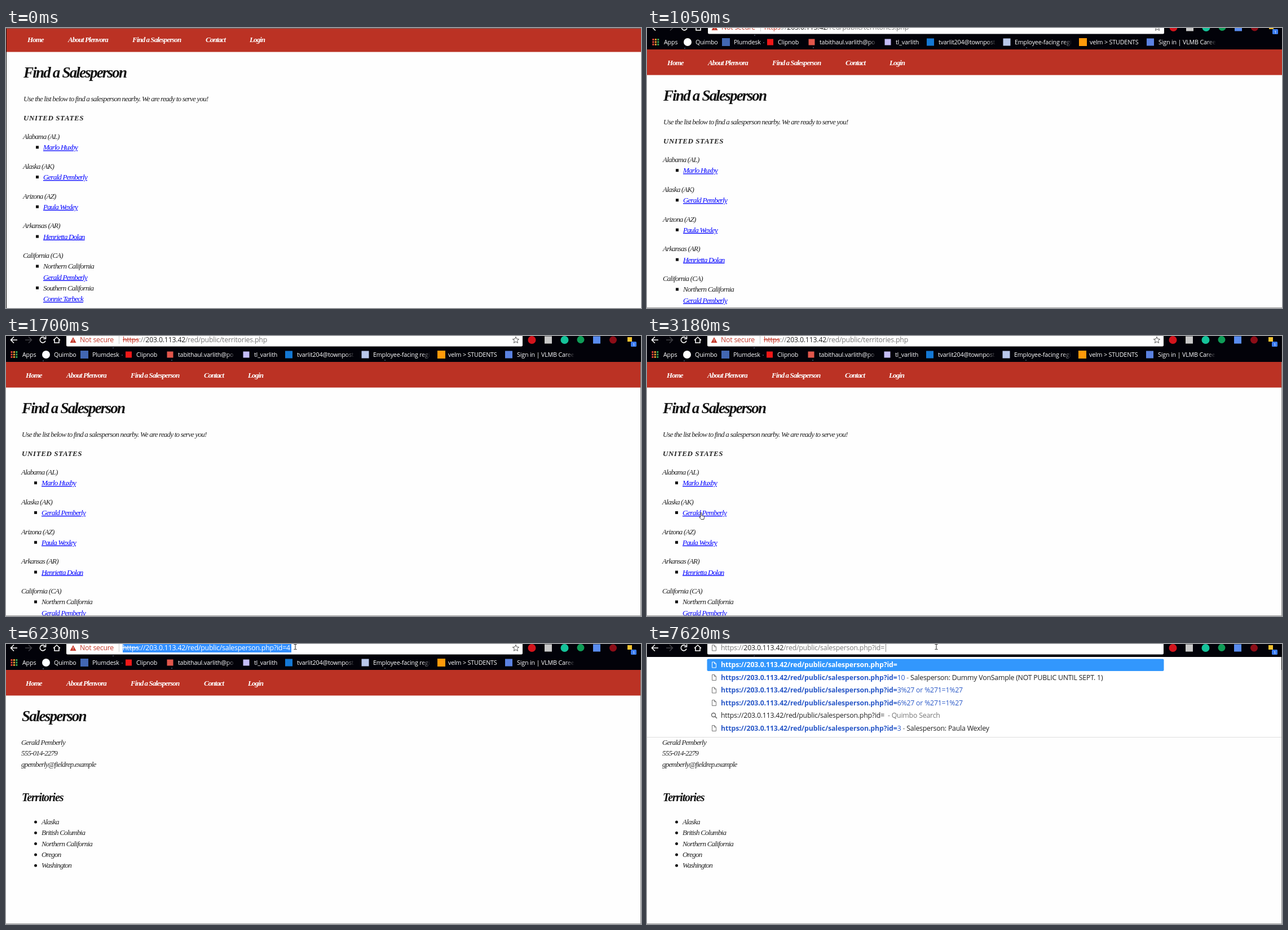
An HTML page for the animation above (8000 ms loop, 1126 px wide and 497 px high).

```html
<!DOCTYPE html>
<html lang="en">
<head>
<meta charset="utf-8">
<title>Find a Salesperson</title>
<style>
html, body { margin: 0; width: 100%; height: 100%; overflow: hidden; background: #111; }
svg { display: block; width: 1126px; height: 497px; }
text { white-space: pre; }
.body, .nav, .caps, .h1, .h2 { font-family: "Liberation Serif", serif; font-style: italic; fill: #222; }
.body { font-size: 13px; letter-spacing: -.8px; }
.nav { font-size: 13px; font-weight: 700; letter-spacing: -.95px; fill: #fff; }
.caps { font-size: 13px; font-weight: 700; letter-spacing: .6px; }
.h1 { font-size: 27px; font-weight: 700; letter-spacing: -1.8px; fill: #111; }
.h2 { font-size: 20px; font-weight: 700; letter-spacing: -1.15px; fill: #111; }
.link { fill: #00f; text-decoration: underline; }
.mark, .url, .badge { font-family: "Open Sans", sans-serif; }
.mark { font-size: 10.7px; letter-spacing: -.15px; fill: #fff; }
.badge { font-size: 8px; fill: #fff; }
.url { font-size: 12.3px; letter-spacing: -.2px; fill: #777; }
.host { fill: #222; }
.bad { fill: #c5392b; }
.strike { text-decoration: line-through; }
.bold { font-weight: 700; letter-spacing: -.1px; }
.blue { fill: #2a59c8; }
.white, .selected, .selected tspan { fill: #fff; }
.line { fill: none; stroke: #fff; stroke-width: 1.6; }
</style>
</head>
<body>
<svg id="stage" viewBox="0 0 1126 497"></svg>
<script>
const LOOP = 8000;
const IP = '203.0.113.42';
const PERSON = '/red/public/salesperson.php?id=';

const text = (x, y, s, cls = 'body') => `<text x="${x}" y="${y}" class="${cls}">${s}</text>`;
const rect = (x, y, w, h, fill, more = '') =>
  `<rect x="${x}" y="${y}" width="${w}" height="${h}" fill="${fill}" ${more}/>`;
const dot = (x, y, r, fill) => `<circle cx="${x}" cy="${y}" r="${r}" fill="${fill}"/>`;
const path = (d, more) => `<path d="${d}" ${more}/>`;
const span = (cls, s) => `<tspan class="${cls}">${s}</tspan>`;
const group = (id, s) => `<g id="${id}">${s}</g>`;
const square = (x, y, size, fill) => rect(x - size / 2, y - size / 2, size, size, fill);
const docIcon = (y, color) =>
  path(`M115.5 ${y - 5}h4l3 3v7h-7zM119.5 ${y - 5}v3h3`, `fill="none" stroke="${color}"`);

// Bookmark label; with an end it fades out there
function mark(x, s, end) {
  if (!end) return text(x, 37, s, 'mark');
  return `<linearGradient id="fade${x}" gradientUnits="userSpaceOnUse" x1="${end - 16}" x2="${end}" y1="0" y2="0">
    <stop stop-color="#fff"/><stop offset="1" stop-color="#fff" stop-opacity="0"/></linearGradient>
    <text x="${x}" y="37" class="mark" style="fill:url(#fade${x})">${s}</text>`;
}

function bookmarks() {
  let s = rect(-2, -40, 1127, 86, '#020209');
  const apps = ['#e8453c', '#f0a030', '#3aa757', '#4285f4'];
  for (let i = 0; i < 9; i++) {
    const col = i % 3, row = Math.floor(i / 3);
    s += rect(8.5 + col * 4.4, 27 + row * 4.4, 3, 3, apps[(i + row) % 4]);
  }
  for (const [x, y] of [[66, 44], [206, 34], [294, 43], [672, 43], [190, 21]]) s += dot(x, y, .8, '#89b');
  s += dot(71, 33, 7, '#fff') + square(139, 33, 14, '#4267b2') + square(217.5, 33, 11, '#f01818')
    + square(291, 33, 11, '#e2574c') + square(426, 33, 11, '#c4bdf6') + square(501.5, 33, 13, '#1478d4')
    + square(637, 33, 13, '#b9c8ea') + square(772, 33, 14, '#ff9a0a') + square(891.5, 33, 13, '#5b82e2');
  return s + mark(29, 'Apps') + mark(85, 'Quimbo') + mark(153, 'Plumdesk') + mark(231, 'Clipnob')
    + mark(305, 'tabithaul.varlith@po', 407) + mark(440, 'tl_varlith')
    + mark(516, 'tvarlit204@townpost.c', 618) + mark(651, 'Employee-facing regi', 753)
    + mark(784, 'velm &gt; STUDENTS') + mark(906, 'Sign in | VLMB Career', 1008);
}

function toolbar() {
  return path('M20 7H9M14 1.5L8.5 7l5.5 5.5', 'class="line"')
    + path('M34 7h11M40 1.5L45.5 7l-5.5 5.5', 'class="line" opacity=".25"')
    + group('reload', path('M69 3.5a5 5 0 1 0 1 5M70.5 .5v4.5h-4.5', 'class="line"'))
    + group('stop', path('M60.5 2.5l9 9M69.5 2.5l-9 9', 'class="line"'))
    + path('M84 7.5l6-5.5 6 5.5M86 6.5v5.5h8v-5.5', 'class="line"')
    + rect(107, -9, 809, 27.5, '#fff', 'rx="2"')
    + group('star', path('M904 1.5l1.6 3.7 4 .4-3 2.7.9 4-3.5-2.1-3.5 2.1.9-4-3-2.7 4-.4z', 'fill="none" stroke="#555"'))
    + dot(932.5, 7, 7, '#d3141c') + square(961.5, 7, 13, '#c9c9c9') + dot(990.5, 7, 7, '#15c39a')
    + dot(1019, 6.5, 6.5, '#0f9d58') + square(1047.5, 7, 13, '#5a8df0') + dot(1076.5, 7, 6.5, '#8c0d17')
    + square(1106, 6, 8, '#f2c230')
    + rect(1108, 10, 10, 9, '#3b7cf0', 'rx="1.5"') + text(1111, 17.5, '1', 'badge');
}

const insecure = group('insecure',
  path('M119 2l5.5 10h-11z', 'fill="#c5392b"') + rect(118.5, 5.5, 1, 3, '#fff') + rect(118.5, 9.5, 1, 1, '#fff')
  + text(131, 11, 'Not secure', 'url bad') + rect(200, 0, 1, 14, '#ccc'));

const address = (id, tail) =>
  `<text id="${id}" x="207" y="11" class="url">${span('bad strike', 'https')}://${span('host', IP)}${tail}</text>`;

function listPage() {
  const states = [['Alabama (AL)', 'Marlo Huxby'], ['Alaska (AK)', 'Gerald Pemberly'],
    ['Arizona (AZ)', 'Paula Wexley'], ['Arkansas (AR)', 'Henrietta Dolan'], ['California (CA)']];
  const areas = [['Northern California', 'Gerald Pemberly'], ['Southern California', 'Connie Tarbeck']];
  const bullet = y => rect(50, y - 7, 5, 5, '#111');
  let s = text(28, 137, 'Find a Salesperson', 'h1')
    + text(28, 179, 'Use the list below to find a salesperson nearby. We are ready to serve you!')
    + text(28, 213, 'UNITED STATES', 'caps');
  states.forEach(([state, name], i) => {
    const y = 246 + 52.8 * i;
    s += text(27, y, state);
    if (name) s += bullet(y + 19.2) + text(63, y + 19.2, name, 'body link');
  });
  areas.forEach(([area, name], i) => {
    const y = 476.4 + 38.4 * i;
    s += bullet(y) + text(63, y, area) + text(63, y + 19.2, name, 'body link');
  });
  return group('list', s);
}

function personPage() {
  let s = text(28, 137, 'Salesperson', 'h1') + text(28, 279, 'Territories', 'h2');
  ['Gerald Pemberly', '555-014-2279', 'gpemberly@fieldrep.example'].forEach((v, i) => s += text(27, 179 + 19.3 * i, v));
  ['Alaska', 'British Columbia', 'Northern California', 'Oregon', 'Washington'].forEach((v, i) => {
    const y = 320 + 19.3 * i;
    s += dot(52.5, y - 4, 2.5, '#111') + text(63, y, v);
  });
  return group('person', s);
}

function dropdown() {
  const link = `https://${IP}${PERSON}`;
  const bold = span('bold blue', link);
  const rows = [
    span('bold white', link),
    bold + span('blue', '10') + ' - ' + span('host', 'Salesperson: Dummy VonSample (NOT PUBLIC UNTIL SEPT. 1)'),
    bold + span('blue', '3%27 or %271=1%27'),
    bold + span('blue', '6%27 or %271=1%27'),
    span('host', link) + '  - Quimbo Search',
    bold + span('blue', '3') + ' - ' + span('host', 'Salesperson: Paula Wexley')
  ];
  let s = docIcon(7, '#777') + text(131, 11, `https://${span('host', IP)}${PERSON}`, 'url')
    + rect(423, 0, 1, 14, '#888')
    + rect(-2, 23, 1127, 142, '#fff') + rect(-2, 165, 1127, 1, '#ddd')
    + rect(106.5, 26.5, 810, 21.5, '#3297fd', 'rx="2"');
  rows.forEach((row, i) => {
    const y = 37 + 22.5 * i;
    s += text(131, y + 4.3, row, 'url');
    s += i == 4
      ? path(`M120.5 ${y + 1.5}l3.5 3.5`, 'stroke="#666" stroke-width="1.6"')
        + `<circle cx="118" cy="${y - 1}" r="3.5" fill="none" stroke="#666" stroke-width="1.4"/>`
      : docIcon(y, i ? '#777' : '#fff');
  });
  return group('drop', s);
}

const nav = rect(-2, 46, 1127, 45.5, '#bb3224')
  + [[35, 'Home'], [107, 'About Plenvora'], [221, 'Find a Salesperson'], [351, 'Contact'], [429, 'Login']]
    .map(([x, s]) => text(x, 74, s, 'nav')).join('');

const outline = 'fill="#fff" stroke="#111" stroke-width=".8" stroke-linejoin="round"';
const cursors = group('arrow', path('M.5 .5v10l2.3-2 1.6 3.5 1.6-.8-1.5-3.3h3z', outline))
  + group('hand', path('M3 8V1.5a1 1 0 0 1 2 0V6l3.7.8q1 .3 1 1.5L8.8 12.5H4L.5 8.5q.5-1.2 2.5.3z', outline))
  + group('beam', path('M-2.5-4.5h2l.5.5.5-.5h2M-2.5 4.5h2l.5-.5.5.5h2M0-4v8', 'fill="none" stroke="#222"'));

document.getElementById('stage').innerHTML =
  group('window', rect(-2, 46, 1127, 520, '#fefefe') + nav + listPage() + personPage() + bookmarks() + toolbar()
    + insecure + rect(207, 0, 299, 15, '#3390ff', 'id="selection"')
    + address('listUrl', '/red/public/territories.php') + address('personUrl', PERSON + '4')
    + rect(506, 0, 1, 14, '#222', 'id="caret"') + rect(1125, 46, 1, 520, '#888') + dropdown() + cursors)
  + rect(0, 0, 1126, 1, '#666', 'id="topEdge"') + rect(0, 496, 1126, 1, '#999', 'id="bottomEdge"');

const el = id => document.getElementById(id);
const show = (id, on) => el(id).style.display = on ? '' : 'none';
const latest = (keys, t) => keys.findLast(k => k[0] <= t);

const pan = [[0, 3, -49], [900, 3, -20], [1050, 1, -8], [1180, 0, 0]];
const pointer = [
  [0, 0, 0, ''], [1980, 291, 105, 'arrow'], [2120, 181, 211, 'arrow'], [2380, 156, 248, 'arrow'],
  [2520, 98, 332, 'arrow'], [2680, 98, 326, 'hand'], [2820, 97, 322, 'hand'], [2940, 95, 318, 'hand'],
  [3060, 93, 315, 'hand'], [3180, 92, 313, 'hand'], [3830, 198, 193, 'arrow'], [3980, 509, 84, 'arrow'],
  [4280, 513, 5, 'beam']
];

function draw(t) {
  const between = (a, b) => t >= a && t < b;
  const [, px, py] = latest(pan, t);
  el('window').setAttribute('transform', `translate(${px} ${py})`);
  show('topEdge', t < 900);
  show('bottomEdge', t >= 900);

  const opened = t >= 4280, typing = t >= 7620, selected = between(6230, 6790);
  show('list', !opened);
  show('person', opened);
  show('listUrl', !opened);
  show('personUrl', opened && !typing);
  show('insecure', !typing);
  show('star', !typing);
  show('drop', typing);
  show('selection', selected);
  el('personUrl').classList.toggle('selected', selected);
  show('caret', between(6080, 6230) || between(6790, 7350));

  const loading = between(3710, 4410);
  show('stop', loading);
  show('reload', !loading);

  const [, x, y, kind] = latest(pointer, t);
  for (const id of ['arrow', 'hand', 'beam']) show(id, id == kind);
  if (kind) el(kind).setAttribute('transform', `translate(${x} ${y})`);
}

const start = performance.now();
function tick() {
  draw((performance.now() - start) % LOOP);
  requestAnimationFrame(tick);
}
tick();
</script>
</body>
</html>
```
